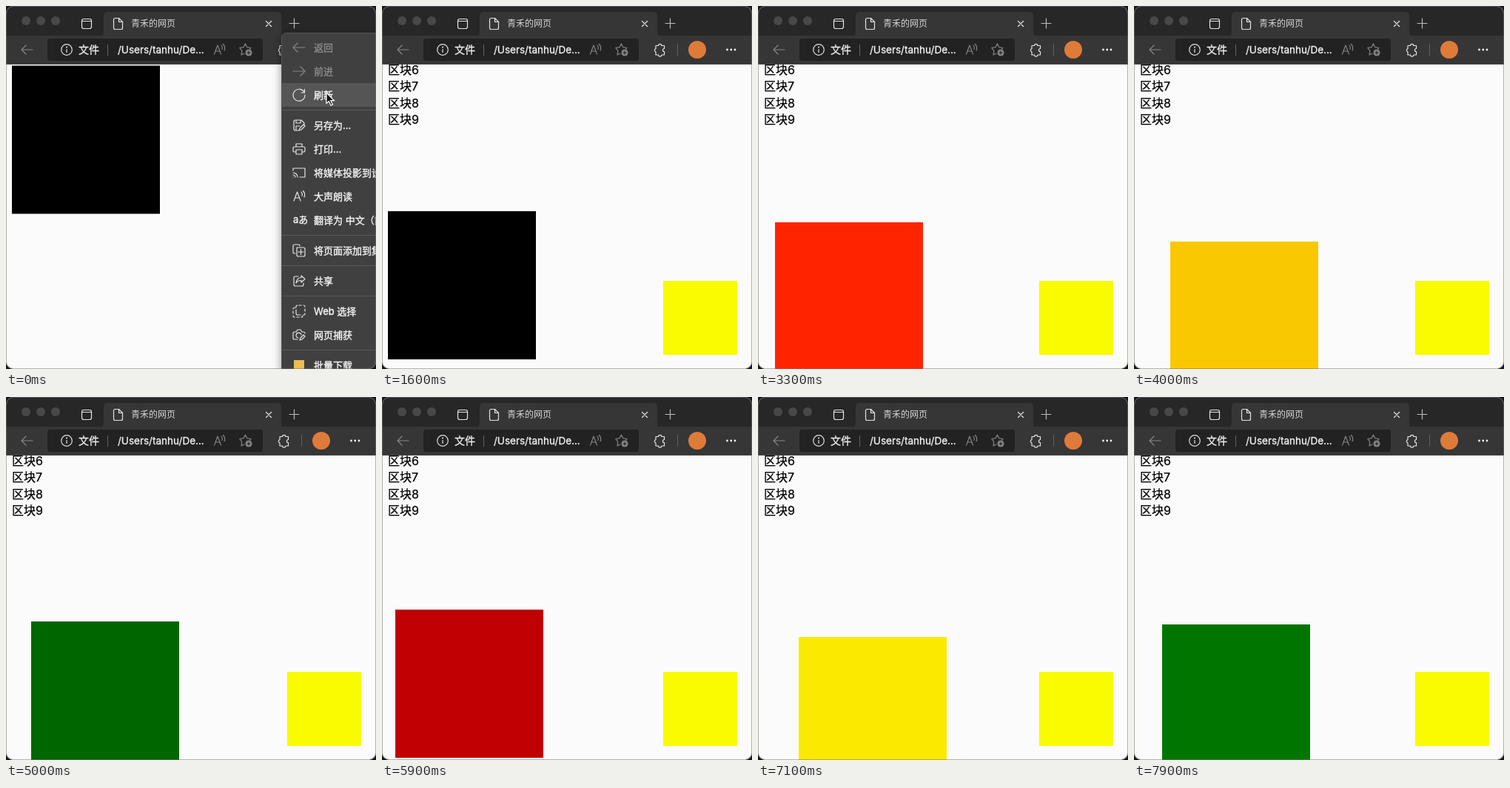
These frames come from a looping animation (500 by 490 pixels, 8000 ms). An HTML page:

```html
<!DOCTYPE html>
<html lang="zh-CN">
<head>
<meta charset="utf-8">
<title>网页</title>
<style>
  html, body { margin: 0; width: 100%; height: 100%; overflow: hidden; background: #161616; }
  svg { display: block; width: 500px; height: 490px; }
  text { font-family: Inter, "Noto Sans CJK SC", "Noto Sans CJK", sans-serif; }
  .icon { fill: none; stroke: #e4e4e4; stroke-width: 1.2; stroke-linecap: round; stroke-linejoin: round; }
  .dim { stroke: #858585; }
  .solid { fill: #f2f2f2; stroke: none; }
  .bar { font-size: 14px; fill: #f2f2f2; stroke: #f2f2f2; stroke-width: .3; }
  .path { font-size: 13.5px; }
  .list { font-size: 16px; fill: #000; stroke: #000; stroke-width: .25; }
  #menu text { font-size: 13px; fill: #f6f6f6; stroke: #f6f6f6; stroke-width: .35; }
  #menu text.off { fill: #8c8c8c; stroke: #8c8c8c; }
</style>
</head>
<body>
<svg viewBox="0 0 500 490">
  <defs>
    <clipPath id="frame"><rect width="500" height="490" rx="10"/></clipPath>
    <clipPath id="view"><rect y="79" width="500" height="411"/></clipPath>
    <filter id="shade" x="-20%" y="-20%" width="140%" height="140%">
      <feDropShadow dx="0" dy="3" stdDeviation="6" flood-opacity=".4"/>
    </filter>
  </defs>

  <g clip-path="url(#frame)">
    <rect width="500" height="490" fill="#fbfbfb"/>
    <g clip-path="url(#view)">
      <g id="list" class="list"></g>
      <rect id="box" x="8" width="200" height="200"/>
      <rect x="380" y="371" width="100" height="100" fill="#fafb00"/>
    </g>

    <!-- tab strip -->
    <rect width="500" height="41" fill="#272727"/>
    <g fill="#484848"><circle cx="27" cy="20" r="6"/><circle cx="47" cy="20" r="6"/><circle cx="67" cy="20" r="6"/></g>
    <path d="M126 41q6 0 6-6V14q0-6 6-6H366q6 0 6 6V35q0 6 6 6z" fill="#363636"/>
    <g class="icon">
      <rect x="102.500" y="17.500" width="13" height="13" rx="2.500"/>
      <path d="M103 20.500h12"/>
      <path d="M147.500 16.500h5l5 5v8q0 2-2 2h-8q-2 0-2-2v-11q0-2 2-2zM152.500 16.500v5h5"/>
      <path d="M351.500 20.500l7 7m0-7l-7 7"/>
      <path d="M383 23.500h13m-6.500-6.500v13" stroke="#b8b8b8"/>
    </g>
    <text x="169" y="28" font-size="12" fill="#d4d4d4">青禾的网页</text>

    <!-- toolbar -->
    <rect y="40" width="500" height="39" fill="#363636"/>
    <path d="M0 78.500H500" stroke="#484848"/>
    <rect x="56" y="44" width="291" height="30" rx="4" fill="#222"/>
    <path class="icon dim" d="M36 59H21m6-6l-6 6 6 6"/>
    <g class="icon">
      <circle cx="82" cy="59" r="7.300"/>
      <path d="M82 58.500v4"/>
      <circle class="solid" cx="82" cy="55.500" r="1"/>
    </g>
    <text class="bar" x="98" y="64">文件</text>
    <path d="M137.500 52v15M399.500 51v16" stroke="#636363"/>
    <text class="bar path" x="151" y="64">/Users/tanhu/De...</text>
    <g class="icon dim">
      <path d="M281.500 65l4.500-12 4.500 12m-7.500-4h6M291 53q2 2.500 1 5.500M293.500 51.500q3.500 4 1.500 8.500"/>
      <path d="M322 64l-4 2 .8-5.400-3-4.100 5.200-.9 2.400-4.600 2.300 4.600 5.300.9-1.500 2"/>
      <circle cx="328" cy="63" r="4.500" fill="#858585" stroke="none"/>
      <path d="M326 63h4m-2-2v4" stroke="#222"/>
    </g>
    <path class="icon" d="M370 53.500h3.500a2.200 2.200 0 0 1 4.400 0h3.600v4a2 2 0 0 0 0 4.200v4.300h-3.600a2.200 2.200 0 0 1-4.400 0H370v-4a2.300 2.300 0 0 1 0-4.400z"/>
    <circle cx="426" cy="59" r="12" fill="#df7b39"/>
    <g fill="#eee"><circle cx="466.500" cy="59" r="1.400"/><circle cx="471.800" cy="59" r="1.400"/><circle cx="477" cy="59" r="1.400"/></g>

    <g id="menu">
      <rect x="372.500" y="36.500" width="260" height="520" rx="6" fill="#404040" stroke="#545454" filter="url(#shade)"/>
      <rect x="373" y="104" width="127" height="32" fill="#555"/>
      <path d="M373 140.500H500M373 309.500H500M373 350.500H500M373 391.500H500M373 464.500H500" stroke="#5a5a5a"/>
      <g id="items"></g>
      <path d="M433 117v14.500l3.400-3 2.600 5.800 2.400-1-2.600-5.700h4.500z" fill="#111" stroke="#fff" stroke-width="1.200"/>
    </g>
    <rect x=".5" y=".5" width="499" height="489" rx="10" fill="none" stroke="#777" stroke-opacity=".55"/>
  </g>
</svg>

<script>
  const LOOP = 8000, STEP = 100;
  const MENU_CLOSES = 200, PAGE_RELOADS = 400;
  const START = 2650, CYCLE = 3000;

  // phase in ms, diagonal offset, red, green, blue
  const KEYS = [
    [0, 0, 0, 0, 0],
    [50, 1, 30, 0, 0],
    [250, 10, 192, 0, 0],
    [650, 15, 255, 36, 0],
    [1350, 41, 250, 200, 0],
    [1500, 50, 251, 250, 0],
    [2250, 30, 0, 118, 0],
    [3000, 0, 0, 0, 0]
  ];

  // centre y, label, icon path around (0, 0), dimmed
  const ITEMS = [
    [56, '返回', 'M8 0H-8m6-6l-6 6 6 6', true],
    [88, '前进', 'M-8 0H8m-6-6l6 6-6 6', true],
    [120, '刷新', 'M7.300-3A8 8 0 1 0 8 0M7.500-7.500v4.500h-4.500'],
    [161, '另存为...', 'M-1 7h-4q-2 0-2-2V-5q0-2 2-2H3l4 4v2M-4-7v4h6v-4M-4 7V1h5M0 7l1-3 5-5 2 2-5 5z'],
    [193, '打印...', 'M-4-3v-4h8v4M-4 4h-2q-2 0-2-2v-3q0-2 2-2H6q2 0 2 2v3q0 2-2 2H4M-4 1h8v6h-8z'],
    [225, '将媒体投影到设备', 'M-8-3v-3H8V6H1M-8 0a6 6 0 0 1 6 6M-8 3a3 3 0 0 1 3 3M-8 6h.1'],
    [257, '大声朗读', 'M-7 6l4.500-12L2 6m-7.500-4h6M3-6q2 2.500 1 5.500M5.500-7.500Q9-3.500 7 1'],
    [289, '翻译为 中文（简体）', ''],
    [330, '将页面添加到集锦', 'M-5 4h-1q-2 0-2-2v-8q0-2 2-2h5q2 0 2 2M-3-4h9q2 0 2 2v8q0 2-2 2h-7q-2 0-2-2zM2.500-1.500v7M-1 2h7'],
    [371, '共享', 'M-1-6h-4q-2 0-2 2v9q0 2 2 2H4q2 0 2-2V3M3-7l5 4.500L3 2v-2.500q-5 0-7 3.500 1-7 7-7.500z'],
    [412, 'Web 选择', 'M-4-5v-1q0-2 2-2M0-8h3M6-8q2 0 2 2M8-3V0M8 3q0 2-2 2M-5-5q-3 0-3 2M-8 0v3M-8 6q0 2 2 2M-3 8H0M3 8q2 0 2-2M-4-2v5q0 2 2 2h4'],
    [444, '网页捕获', 'M-2 6h-4q-2 0-2-2v-6q0-2 2-2h2l2-3h4l2 3h2q2 0 2 2M3 0a3.500 3.500 0 1 0-4 4M1 7l1-3 4-4 2 2-4 4z'],
    [485, '批量下载', '']
  ];

  const $ = id => document.getElementById(id);
  const list = $('list'), box = $('box'), menu = $('menu');

  list.innerHTML = [6, 7, 8, 9]
    .map((n, i) => `<text x="8" y="${92 + i * 22.4}">区块${n}</text>`).join('');

  $('items').innerHTML = ITEMS.map(([y, label, path, off]) =>
    `<path class="icon${off ? ' dim' : ''}" transform="translate(396 ${y})" d="${path}"/>` +
    `<text x="416" y="${y + 5}"${off ? ' class="off"' : ''}>${label}</text>`).join('') +
    '<text x="388" y="293">aあ</text>' +
    '<rect x="389" y="478" width="14" height="14" fill="#e9bd55"/>';

  function pose(t) {
    if (t < START) return KEYS[0].slice(1);
    const p = (t - START) % CYCLE;
    const i = KEYS.findIndex(k => k[0] > p);
    const a = KEYS[i - 1], b = KEYS[i];
    const f = (p - a[0]) / (b[0] - a[0]);
    return a.slice(1).map((v, j) => v + (b[j + 1] - v) * f);
  }

  function draw(t) {
    const reloaded = t >= PAGE_RELOADS;
    const [shift, ...rgb] = pose(t);
    menu.style.display = t < MENU_CLOSES ? '' : 'none';
    list.style.display = reloaded ? '' : 'none';
    box.setAttribute('x', 8 + Math.round(shift));
    box.setAttribute('y', (reloaded ? 277 : 80.5) + Math.round(shift));
    box.setAttribute('fill', `rgb(${rgb.map(Math.round)})`);
  }

  const begin = performance.now();
  function tick() {
    const t = (performance.now() - begin) % LOOP;
    draw(Math.floor(t / STEP) * STEP);
    requestAnimationFrame(tick);
  }
  draw(0);
  requestAnimationFrame(tick);
</script>
</body>
</html>
```
